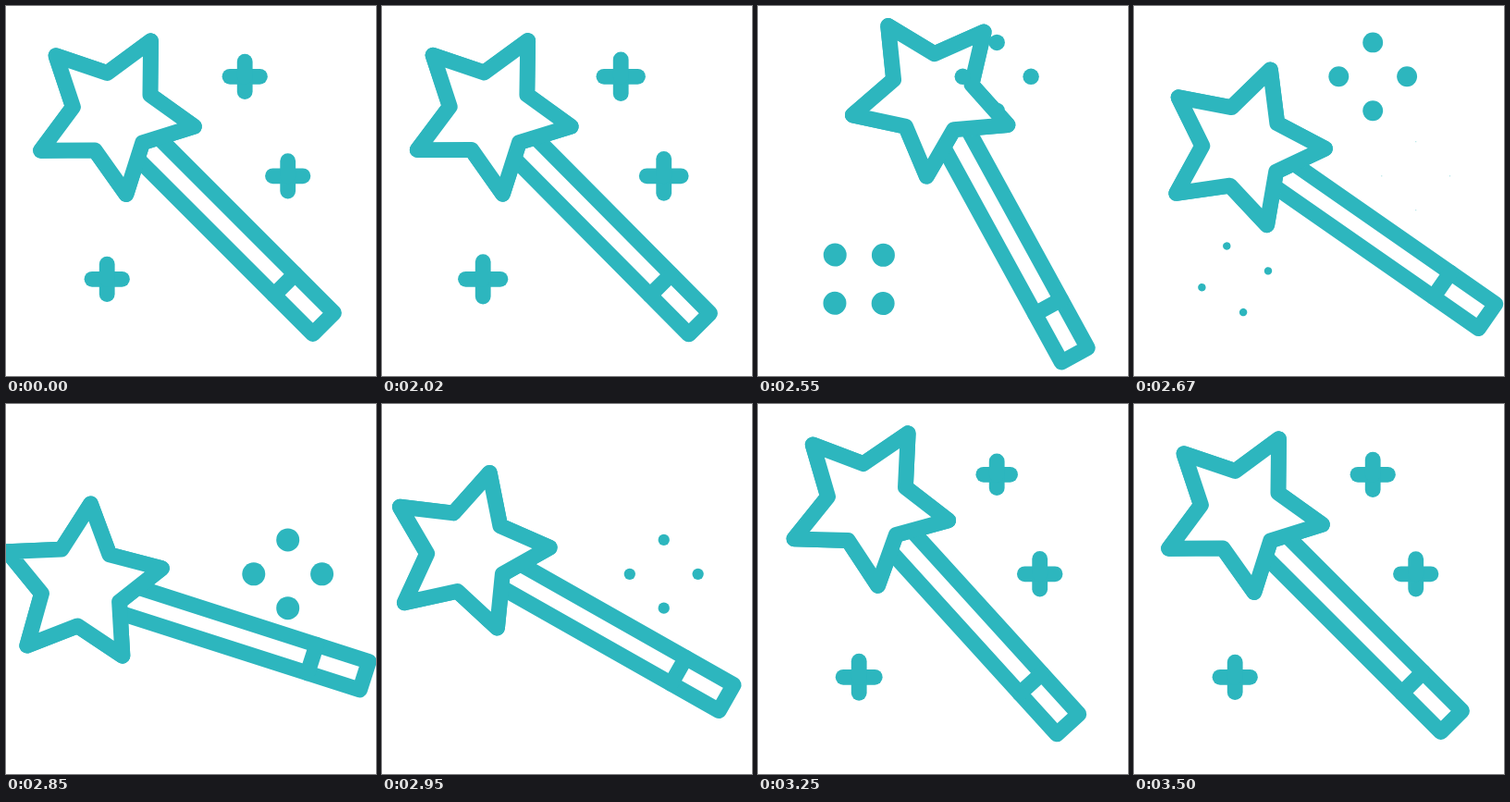
Animation, 400 px wide and 400 px high, one loop 3.52 s. Source, as an HTML page with a canvas:

```html
<!DOCTYPE html>
<html lang="en">
<head>
<meta charset="utf-8">
<title>Magic wand</title>
<style>
  html, body { margin: 0; width: 100%; height: 100%; overflow: hidden; background: #fff; }
  canvas { display: block; width: 400px; height: 400px; }
</style>
</head>
<body>
<canvas id="stage" width="400" height="400"></canvas>
<script>
const ctx = document.getElementById('stage').getContext('2d');
const LOOP = 3520;
const REST = 2000;
const COLOR = '#2db6be';
const LINE = 16.8;
const DOT = 8.4;
const REACH = 36.9;
const ARM = 16.2;
const RAD = Math.PI / 180;

// The wand swings back, then forward, overshoots and settles.
const rest = { angle: 0, x: 200, y: 200 };
const back = { angle: 20, x: 249, y: 197 };
const forward = { angle: -29, x: 194.5, y: 234 };
const overshoot = { angle: 3.5, x: 198.4, y: 195.3 };
const swings = [
  { from: REST, to: 2318, pose: back },
  { from: 2497, to: 2800, pose: forward },
  { from: 2800, to: 3138, pose: overshoot },
  { from: 3138, to: 3500, pose: rest }
];

// Each sparkle follows the one before it; bloom is when its dots are largest.
const sparkles = [
  { x: 109.2, y: 295.3, bloom: 2550, spins: true },
  { x: 304.7, y: 183.8, bloom: 2850 },
  { x: 258.2, y: 76.3, bloom: 2625 }
];

const lerp = (a, b, p) => a + (b - a) * p;
const progress = (t, from, to) => Math.min(1, Math.max(0, (t - from) / (to - from)));
const easeOut = p => 1 - (1 - p) ** 2;
const easeInOut = p => (1 - Math.cos(Math.PI * p)) / 2;
const backOut = p => 1 + 2.2 * (p - 1) ** 3 + 1.2 * (p - 1) ** 2;

function wandPose(t) {
  return swings.reduce((now, { from, to, pose }) => {
    const p = easeInOut(progress(t, from, to));
    return {
      angle: lerp(now.angle, pose.angle, p),
      x: lerp(now.x, pose.x, p),
      y: lerp(now.y, pose.y, p)
    };
  }, rest);
}

function strokePath(points, closed) {
  ctx.beginPath();
  points.forEach(([x, y]) => ctx.lineTo(x, y));
  if (closed) ctx.closePath();
  ctx.stroke();
}

function drawStar(turn) {
  const points = Array.from({ length: 10 }, (_, i) => {
    const angle = (9.1 + i * 36) * RAD;
    const radius = i % 2 ? 44.4 : 88.3;
    return [radius * Math.cos(angle), radius * Math.sin(angle)];
  });
  ctx.save();
  ctx.translate(-83.7, -83.7);
  ctx.rotate(turn * RAD);
  ctx.fillStyle = '#fff';
  strokePath(points, true);
  ctx.fill();
  strokePath(points, true);
  ctx.restore();
}

function drawWand(t) {
  const { angle, x, y } = wandPose(t);
  ctx.save();
  ctx.translate(x, y);
  ctx.rotate(angle * RAD);

  // The stick lies along the x axis of its own turned frame.
  ctx.save();
  ctx.rotate(45 * RAD);
  const half = 16.1, tip = -65.5, split = 143, end = 202.4;
  strokePath([[tip, half], [end, half], [end, -half], [tip, -half]]);
  strokePath([[split, half], [split, -half]]);
  ctx.restore();

  // After the swing back, the star trails the stick.
  drawStar(-0.23 * angle * easeInOut(progress(t, 2320, 2500)));
  ctx.restore();
}

function drawArms(inner, outer, radius, turn = 0) {
  if (radius < 0.2) return;
  ctx.save();
  ctx.rotate(turn);
  ctx.lineWidth = radius * 2;
  for (let i = 0; i < 4; i++) {
    strokePath([[inner, 0], [outer + 0.01, 0]]);
    ctx.rotate(Math.PI / 2);
  }
  ctx.restore();
}

function burst(t, { bloom, spins }, i) {
  const outer = lerp(ARM, REACH, easeOut(progress(t, REST, REST + 340 + 35 * i)));
  const inner = REACH * easeInOut(progress(t, REST + 40, REST + 350 + 60 * i));
  const fading = DOT * (1 - easeInOut(progress(t, 2380, 2530)));
  const pulse = 12.5 * easeInOut(1 - progress(Math.abs(t - bloom), 0, 200));
  const turn = spins ? Math.PI / 2 * easeInOut(progress(t, bloom - 250, bloom + 250)) : 0;
  drawArms(Math.min(inner, outer), outer, Math.max(fading, pulse), turn);
}

function regrow(t, start) {
  const radius = DOT * progress(t, start - 50, start);
  drawArms(0, ARM * backOut(progress(t, start, start + 300)), radius);
}

function drawSparkle(sparkle, i, t) {
  const start = 3070 + 40 * i;
  ctx.save();
  ctx.translate(sparkle.x, sparkle.y);
  if (t < start - 50) burst(t, sparkle, i);
  else regrow(t, start);
  ctx.restore();
}

function draw(t) {
  ctx.fillStyle = '#fff';
  ctx.fillRect(0, 0, 400, 400);
  ctx.strokeStyle = COLOR;
  ctx.lineWidth = LINE;
  ctx.lineCap = ctx.lineJoin = 'round';
  drawWand(t);
  sparkles.forEach((sparkle, i) => drawSparkle(sparkle, i, t));
}

const begin = performance.now();
function tick() {
  draw((performance.now() - begin) % LOOP);
  requestAnimationFrame(tick);
}
tick();
</script>
</body>
</html>
```
